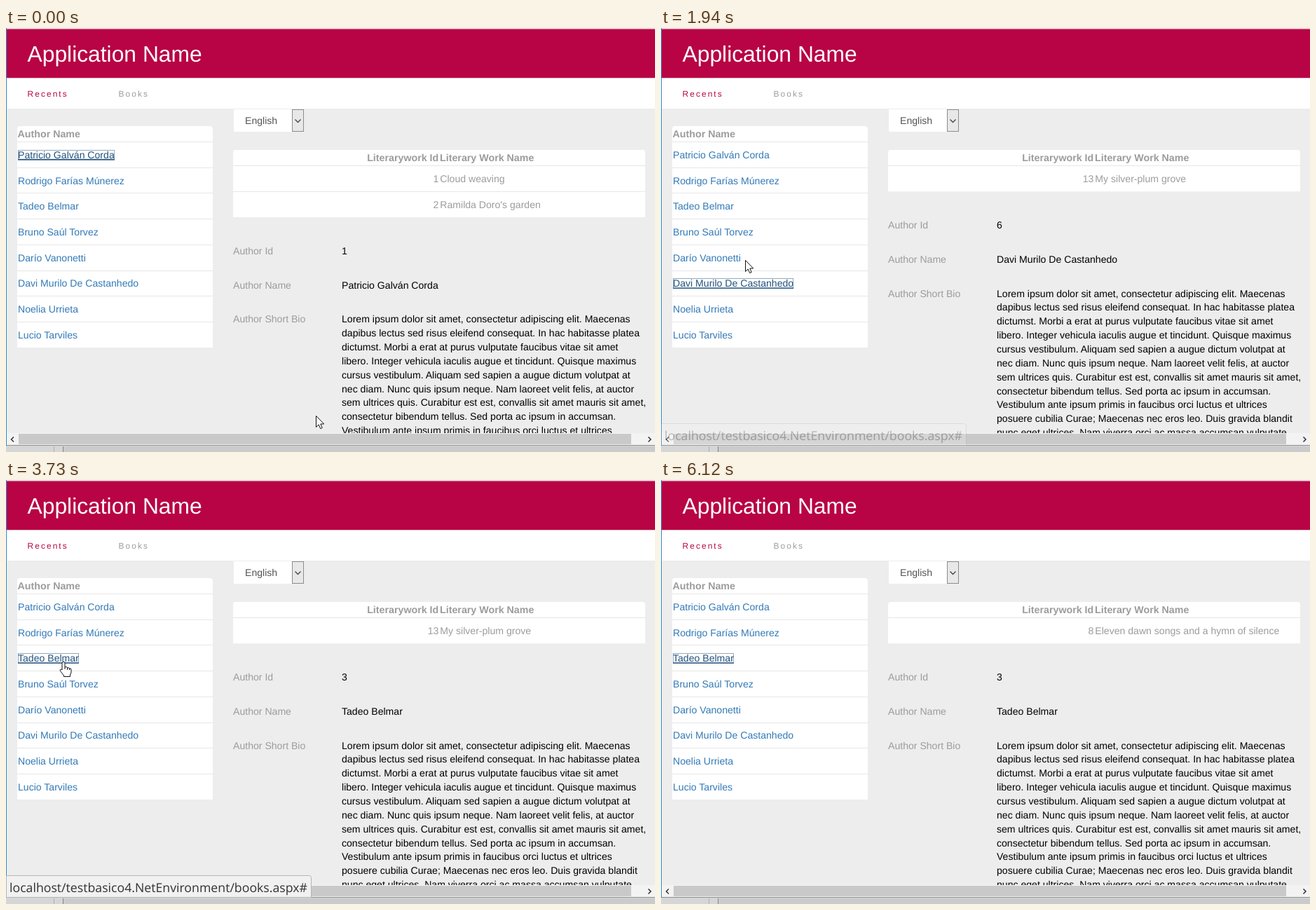
Recreate the animation shown at these times as an HTML page. Size 926 by 605 pixels, loop 7940 ms.

```html
<!DOCTYPE html>
<html lang="en">
<head>
<meta charset="utf-8">
<title>Author list</title>
<style>
  html, body { margin: 0; width: 100%; height: 100%; overflow: hidden; background: #ededed; }
  svg { display: block; width: 100vw; height: 100vh; }
  text { font: 14.08px "Liberation Sans", Arial, sans-serif; fill: #9c9c9c; text-rendering: geometricPrecision; white-space: pre; }
  .title { font-size: 31.8px; fill: #fff; }
  .menu { font-size: 11.9px; letter-spacing: 2.1px; }
  .bold { font-size: 14.25px; font-weight: bold; }
  .value { fill: #000; }
  .link { fill: #337ab7; }
  .link.on { fill: #23527c; text-decoration: underline; }
  .end { text-anchor: end; }
  .status { font: 17.7px "Open Sans", "Noto Sans", sans-serif; fill: #333; }
</style>
</head>
<body>
<svg id="stage" viewBox="0 0 926 605" preserveAspectRatio="none"></svg>
<script>
const LOOP = 7940, ROW = 36.7, LINE = 19.86, CRIMSON = '#b80344';

const authors = [
  'Patricio Galván Corda', 'Rodrigo Farías Múnerez', 'Tadeo Belmar', 'Bruno Saúl Torvez',
  'Darío Vanonetti', 'Davi Murilo De Castanhedo', 'Noelia Urrieta', 'Lucio Tarviles'
];

const works = {
  pair: [[1, 'Cloud weaving'], [2, "Ramilda Doro's garden"]],
  plum: [[13, 'My silver-plum grove']],
  songs: [[8, 'Eleven dawn songs and a hymn of silence']]
};

const bio = `Lorem ipsum dolor sit amet, consectetur adipiscing elit. Maecenas
dapibus lectus sed risus eleifend consequat. In hac habitasse platea
dictumst. Morbi a erat at purus vulputate faucibus vitae sit amet
libero. Integer vehicula iaculis augue et tincidunt. Quisque maximus
cursus vestibulum. Aliquam sed sapien a augue dictum volutpat at
nec diam. Nunc quis ipsum neque. Nam laoreet velit felis, at auctor
sem ultrices quis. Curabitur est est, convallis sit amet mauris sit amet,
consectetur bibendum tellus. Sed porta ac ipsum in accumsan.
Vestibulum ante ipsum primis in faucibus orci luctus et ultrices
posuere cubilia Curae; Maecenas nec eros leo. Duis gravida blandit
nunc eget ultrices. Nam viverra orci ac massa accumsan vulputate`.split('\n');

// Screen recording: every step is a hard change, later steps keep what they do not set.
const at = (x, y, pointer, more) => ({ x, y, pointer, ...more });
const arrow = (x, y, more) => at(x, y, 'arrow', more);
const hand = (x, y, more) => at(x, y, 'hand', more);
const beam = (x, y) => at(x, y, 'beam');
const steps = [
  [0, arrow(442, 553, { focus: 0, hover: -1, id: 0, name: 0, list: 'pair', status: 0, drag: false })],
  [150, arrow(432, 549)],
  [430, arrow(423, 545)],
  [550, arrow(405, 536)],
  [700, arrow(326, 500)],
  [830, arrow(235, 463)],
  [980, arrow(160, 393)],
  [1100, hand(144, 368, { hover: 5 })],
  [1220, { status: 0.6 }],
  [1370, { status: 1 }],
  [1520, hand(142, 365, { focus: 5, id: 5 })],
  [1670, { name: 5 }],
  [1790, arrow(120, 331, { hover: -1 })],
  [1940, { list: 'plum', status: 0.3 }],
  [2090, arrow(119, 329, { status: 0 })],
  [2520, arrow(119, 327)],
  [2680, arrow(88, 293)],
  [2830, arrow(88, 279, { hover: 3 })],
  [2950, arrow(86, 268, { hover: -1 })],
  [3100, hand(84, 260, { hover: 2 })],
  [3230, hand(82, 259, { status: 0.5 })],
  [3350, { status: 0.8 }],
  [3470, { status: 1 }],
  [3610, { focus: 2, id: 2 }],
  [3730, { name: 2 }],
  [3850, arrow(111, 245, { hover: -1 })],
  [4000, arrow(216, 229)],
  [4150, arrow(318, 317, { list: 'songs', status: 0.3 })],
  [4270, arrow(385, 388, { status: 0 })],
  [5550, beam(524, 455)],
  [5700, beam(840, 562)],
  [5840, arrow(862, 583, { drag: true })],
  [5970, arrow(872, 596)],
  [6120, { pointer: 'none', drag: false }]
];

const rect = (x, y, w, h, fill, more = '') =>
  `<rect x="${x}" y="${y}" width="${w}" height="${h}" fill="${fill}" ${more}/>`;
const text = (x, y, str, cls = '', more = '') =>
  `<text x="${x}" y="${y}" class="${cls}" ${more}>${str}</text>`;
const stroke = (d, color, w = 1) =>
  `<path d="${d}" fill="none" stroke="${color}" stroke-width="${w}"/>`;
const outlined = d => `<path d="${d}" fill="#fff" stroke="#111"/>`;

// White table with rounded top corners, a header and row lines.
function table(x, y, w, rows) {
  const h = 22.5 + rows * ROW;
  let out = `<path d="M${x} ${y + h}V${y + 4}q0-4 4-4h${w - 8}q4 0 4 4V${y + h}Z" fill="#fff"/>`;
  for (let i = 0; i < rows; i++) out += rect(x, Math.round(y + 22 + i * ROW), w, 1, '#e7e7e7');
  return out;
}

const rowBase = i => 185.9 + i * ROW;

const pointers = {
  none: '',
  arrow: outlined('M.5.5V16.5L4.2 13 6.7 18.6 9.2 17.5 6.8 12H11.7Z'),
  hand: outlined('M-2 12V2Q-2 .5 0 .5T2 2V8Q5 6.5 5.5 9 8 7.8 8.5 10 11 9 11 12V15Q11 17 9.5 19V21.5H.5V20L-4.5 13.5Q-5.5 11-3.5 11Z') +
    stroke('M2 8V11M5.5 9V12M8.5 10V12', '#111'),
  beam: stroke('M-3 -7.5H-1L.5 -6.5 2 -7.5H4M.5 -6.5V6.5M-3 7.5H-1L.5 6.5 2 7.5H4', '#111')
};

const stage = document.getElementById('stage');
stage.innerHTML =
  `<clipPath id="page"><rect y="115" width="926" height="463"/></clipPath>` +
  rect(0, 0, 926, 605, '#ededed') +
  rect(0, 0, 926, 1.5, '#f1e4e9') +
  rect(0, 1.5, 926, 70, CRIMSON) +
  text(30.5, 48, 'Application Name', 'title') +
  rect(0, 71.5, 926, 43.5, '#fff') +
  text(30.5, 98, 'Recents', 'menu', `style="fill:${CRIMSON}"`) +
  text(160.5, 98, 'Books', 'menu') +
  table(16, 140, 279, authors.length) +
  text(16.5, 156, 'Author Name', 'bold') +
  authors.map((a, i) => text(17, rowBase(i), a, 'link')).join('') +
  `<rect id="focus" x="17.5" height="14" fill="none" stroke="#23527c" stroke-dasharray="1 1"/>` +
  rect(325, 116, 83, 32, '#fff') +
  text(341, 137, 'English', '', 'style="fill:#555"') +
  rect(408.5, 116.5, 16, 31, '#e8e8e8', 'stroke="#8c8c8c"') +
  stroke('M412.5 130.5L416.5 134.5 420.5 130.5', '#444', 1.3) +
  `<g id="grid"></g><g clip-path="url(#page)"><g id="detail">` +
  text(324, 323, 'Author Id') + text(324, 371.7, 'Author Name') + text(324, 420.4, 'Author Short Bio') +
  text(479, 323, '', 'value', 'id="id"') + text(479, 371.7, '', 'value', 'id="name"') +
  bio.map((l, i) => text(479, 420.3 + i * LINE, l, 'value')).join('') +
  `</g></g>` +
  rect(0, 578, 926, 17, '#f3f3f3') +
  rect(18, 579, 874, 15, '#c9c9c9', 'id="thumb"') +
  stroke('M11 583.5L7.5 587 11 590.5M916.5 583.5L920 587 916.5 590.5', '#333', 1.5) +
  rect(0, 595, 926, 1, '#8b8f94') +
  rect(0, 596, 926, 9, '#d6d6d6') +
  rect(82, 597, 844, 8, '#cbcbcb') +
  rect(68, 597, 1, 8, '#b0b0b0') + rect(81, 597, 1, 8, '#858585') +
  rect(0, 0, 1, 596, '#2d8ad2') +
  `<g id="status"><path d="M.5 595.5V564.5H432.5q3 0 3 3V595.5Z" fill="#f1f1f1" stroke="#b5b5b5"/>` +
  text(5, 588, 'localhost/testbasico4.NetEnvironment/books.aspx#', 'status') + `</g>` +
  `<g id="pointer"></g>`;

const el = id => document.getElementById(id);
const links = [...stage.querySelectorAll('.link')];
const shown = {};

// Runs the update only when the value differs from the one on screen.
function change(key, value, update) {
  if (shown[key] === value) return;
  shown[key] = value;
  update(value);
}

function drawGrid(list) {
  const rows = works[list];
  el('grid').innerHTML = table(324, 174, 588, rows.length) +
    text(617.3, 190, 'Literarywork Id', 'bold end') + text(619, 190, 'Literary Work Name', 'bold') +
    rows.map(([n, title], i) =>
      text(617.3, 220 + i * ROW, n, 'end') + text(619.3, 220 + i * ROW, title)).join('');
  el('detail').setAttribute('transform', `translate(0 ${(rows.length - 2) * ROW})`);
}

function drawFocus(i) {
  el('focus').setAttribute('y', Math.round(rowBase(i)) - 11.5);
  el('focus').setAttribute('width', Math.round(links[i].getComputedTextLength()) - 1);
}

function render(time) {
  const s = Object.assign({}, ...steps.filter(([t]) => t <= time).map(([, set]) => set));
  links.forEach((link, i) => link.classList.toggle('on', i === s.focus || i === s.hover));
  change('focus', s.focus, drawFocus);
  change('list', s.list, drawGrid);
  change('id', s.id, v => el('id').textContent = v + 1);
  change('name', s.name, v => el('name').textContent = authors[v]);
  change('pointer', s.pointer, v => el('pointer').innerHTML = pointers[v]);
  el('pointer').setAttribute('transform', `translate(${s.x} ${s.y})`);
  el('status').setAttribute('opacity', s.status);
  el('thumb').setAttribute('fill', s.drag ? '#a6a6a6' : '#c9c9c9');
}

const start = performance.now();
function tick() {
  render((performance.now() - start) % LOOP);
  requestAnimationFrame(tick);
}
tick();
</script>
</body>
</html>
```
